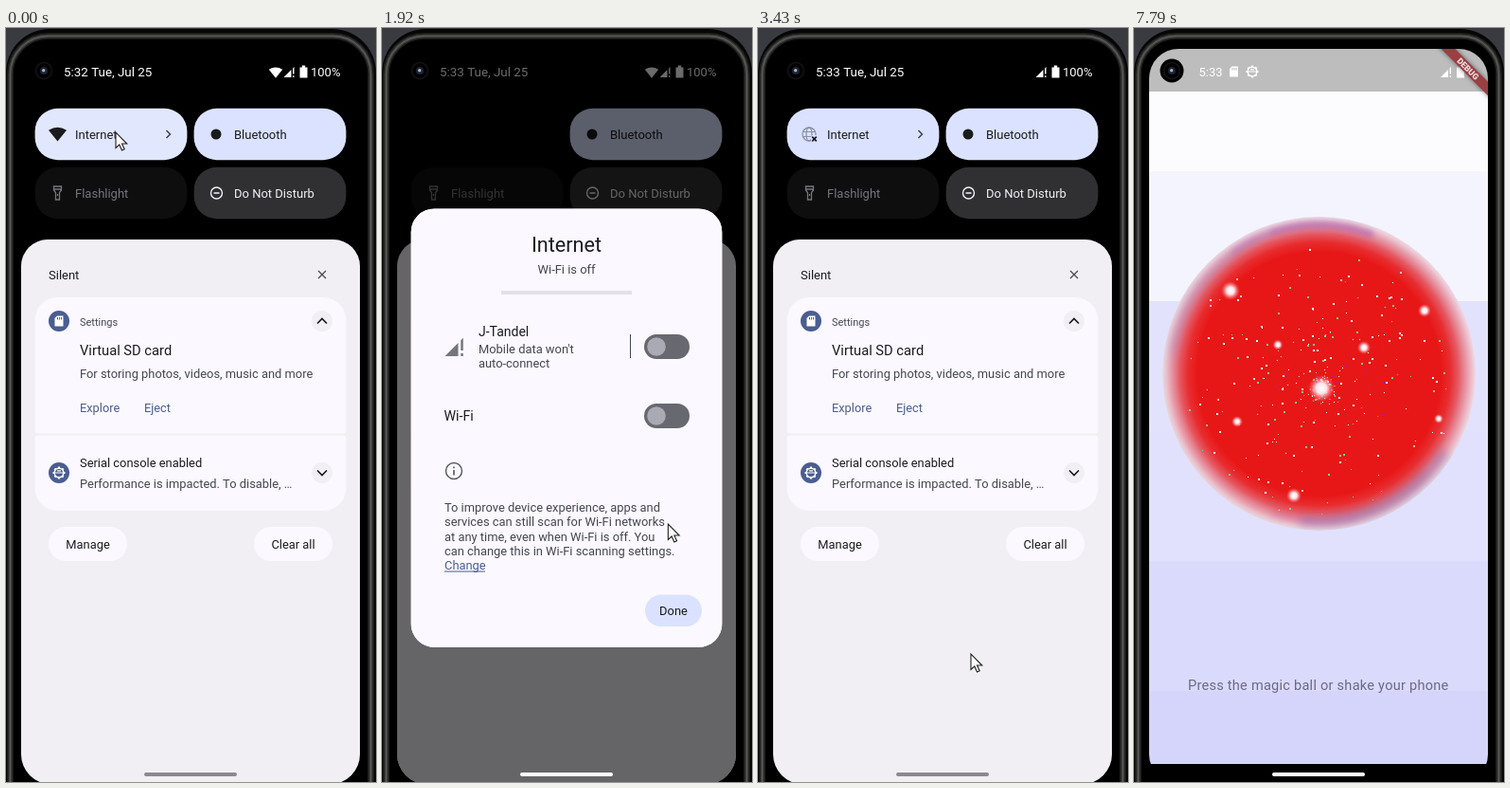
An HTML page with a canvas that plays this animation: 391 by 795 pixels, repeating every 8.62 s.

```html
<!DOCTYPE html>
<html lang="en">
<head>
<meta charset="utf-8">
<title>Phone demo</title>
<style>
html, body { margin: 0; width: 100%; height: 100%; overflow: hidden; background: #3a3b40; }
canvas { display: block; width: 391px; height: 795px; }
</style>
</head>
<body>
<canvas id="stage"></canvas>
<script>
const W = 391, H = 795, LOOP = 8620;
const canvas = document.getElementById('stage');
const dpr = window.devicePixelRatio || 1;
canvas.width = W * dpr;
canvas.height = H * dpr;
const c = canvas.getContext('2d');

const INK = '#1b1b1f', SOFT = '#45464f', BLUE = '#4a5d92', TINT = '#dae2ff';
const PANEL = '#f1eff4', CARD = '#fbf8ff';

// Bursts of motion: start, end, number of steps
const BURSTS = [[150, 1080, 8], [1230, 2210, 8], [2350, 3280, 8],
  [3430, 4390, 8], [4510, 5210, 6], [5480, 5610, 2]];

const CURSOR = [[0, 116, 110], [680, 116, 110], [1080, 308, 347], [1640, 308, 347],
  [2210, 297, 690], [2880, 297, 690], [3280, 225, 660], [3560, 225, 660],
  [4250, 283, 362], [5210, 283, 362], [5480, 365, 375]];

const mix = (a, b, k) => a + (b - a) * k;
const part = (t, a, b) => Math.min(1, Math.max(0, (t - a) / (b - a)));
const easeOut = k => 1 - (1 - k) ** 3;
const smooth = k => k * k * (3 - 2 * k);

function stepTime(t) {
  let last = 0;
  for (const [a, b, n] of BURSTS)
    for (let k = 0; k < n; k++) {
      const s = mix(a, b, k / (n - 1));
      if (s <= t + 12) last = s;
    }
  return last;
}

// ---- drawing helpers ----
function layer(fn, alpha = 1, dx = 0, dy = 0) {
  c.save();
  c.globalAlpha *= Math.max(0, alpha);
  c.translate(dx, dy);
  fn();
  c.restore();
}
function box(x, y, w, h, r, fill) {
  c.beginPath();
  c.roundRect(x, y, w, h, r);
  if (fill) { c.fillStyle = fill; c.fill(); }
}
function disc(x, y, r, fill) {
  c.beginPath();
  c.arc(x, y, r, 0, 7);
  c.fillStyle = fill;
  c.fill();
}
function ring(x, y, r, color, lw) {
  c.beginPath();
  c.arc(x, y, r, 0, 7);
  c.strokeStyle = color;
  c.lineWidth = lw;
  c.stroke();
}
function shape(d, x, y, fill, scale = 1) {
  layer(() => { c.scale(scale, scale); c.fillStyle = fill; c.fill(new Path2D(d)); }, 1, x, y);
}
function line(d, x, y, color, lw = 1.5) {
  layer(() => { c.strokeStyle = color; c.lineWidth = lw; c.stroke(new Path2D(d)); }, 1, x, y);
}
function text(s, x, y, color = INK, size = 13, { weight = 400, align = 'left', gap = 0 } = {}) {
  c.font = `${weight} ${size}px Roboto, sans-serif`;
  c.textAlign = align;
  c.letterSpacing = gap + 'px';
  c.fillStyle = color;
  c.fillText(s, x, y);
}

// ---- icons ----
const wifi = (x, y, color, k = 1) => shape('M0 8L-10 -4.5Q0 -11 10 -4.5Z', x, y, color, k);
function signal(x, y, color, k = 1) {
  shape('M0 12L8 4V12ZM9.6 2.4L11 1V8.5H9.6ZM9.6 10.3H11V12H9.6Z', x, y, color, k);
}
const battery = (x, y) => shape('M0 2H2.3V0H5.7V2H8V13H0Z', x, y, '#fff');
const sdCard = (x, y, color) => shape('M-2 -5.5H4.5V5.5H-4.5V-3Z', x, y, color);
const sdPins = (x, y, color) => line('M-1.5 -4V-1.5M.5 -4V-1.5M2.5 -4V-1.5', x, y, color, 1);
function cog(x, y, r, color, lw) {
  ring(x, y, r, color, lw);
  for (let i = 0; i < 8; i++)
    layer(() => { c.rotate(i * Math.PI / 4); line(`M0 ${-r}V${-r - 1.7}`, 0, 0, color, 2.2); }, 1, x, y);
}
function consoleIcon(x, y, color) {
  cog(x, y, 4.8, color, 1.5);
  line('M-4.5 0H4.5M-2 -2.2H2', x, y, color, 1.2);
}
function gear(x, y) {
  cog(x, y, 6.6, INK, 2);
  ring(x, y, 2.6, INK, 1.8);
}
function torch(x, y, color) {
  line('M-4 -7H4V-3L2 -.5V7H-2V-.5L-4 -3ZM-4 -4H4M0 1V3', x, y, color, 1.3);
}
function globe(x, y) {
  const g = '#8b91a6';
  ring(x, y, 7, g, 1.3);
  c.beginPath();
  c.ellipse(x, y, 3, 7, 0, 0, 7);
  c.stroke();
  line('M-6.5 -2.5H6.5M-6.5 2.5H6.5', x, y, g, 1.2);
  box(x + 2, y + 1, 8, 8, 2, TINT);
  line('M-2.3 -2.3L2.3 2.3M2.3 -2.3L-2.3 2.3', x + 5.5, y + 5, INK, 1.7);
}
function cursor(x, y) {
  const p = new Path2D('M0 0V16.5L3.8 13L6.5 19L9.2 17.8L6.5 12H11.8Z');
  layer(() => {
    c.fillStyle = '#fff';
    c.strokeStyle = '#222';
    c.lineWidth = 1.1;
    c.fill(p);
    c.stroke(p);
  }, 1, x, y);
}

// ---- phone body ----
function body() {
  c.fillStyle = '#3a3b40';
  c.fillRect(0, 0, W, H);
  box(0, 1, 391, 860, 46, '#060607');
  box(4.5, 8.5, 381, 860, 40);
  for (const [lw, color] of [[7, '#1a1a1a'], [4, '#383837'], [1.6, '#585856']]) {
    c.lineWidth = lw;
    c.strokeStyle = color;
    c.stroke();
  }
  box(8, 12, 374, 860, 37, '#000');
}
function camera() {
  disc(40, 45, 12.5, '#000');
  ring(40, 45, 8.5, '#121417', 1.5);
  disc(40, 45, 4, '#1d2333');
  disc(39.7, 44.7, 1.7, '#a9b2cc');
}

// ---- notification shade ----
function tile(x, y, fill, label, color) {
  box(x - .4, y - .2, 160.8, 54.4, 24, fill);
  text(label, x + 42, y + 32, color);
}
function tiles(t, showInternet) {
  const off = t > 2400;
  if (showInternet) {
    tile(31, 85, t < 150 ? '#e1e7fd' : TINT, 'Internet', INK);
    if (off) globe(54, 112); else wifi(54.5, 112, INK, .95);
    line('M-2 -4L2 0L-2 4', 171.5, 112, '#3d4150');
  }
  tile(199, 85, TINT, 'Bluetooth', INK);
  disc(222, 112, 5.5, INK);
  tile(31, 147, '#0e0e0f', 'Flashlight', '#77777b');
  torch(54.5, 174, '#77777b');
  tile(199, 147, '#303033', 'Do Not Disturb', '#f2f0f4');
  ring(222.5, 174, 6, '#f2f0f4', 1.4);
  line('M-3 0H3', 222.5, 174, '#f2f0f4');
}
function header(t) {
  text(`5:${t < 680 ? 32 : 33} Tue, Jul 25`, 61, 51, '#fff', 13.4);
  if (t < 2950) {
    wifi(285, 47, '#fff', .72);
    if (t > 2340) {
      c.fillStyle = '#000';
      c.fillRect(286, 46, 5, 8);
      c.fillStyle = '#fff';
      c.fillRect(288, 46, 1.6, 4.5);
      c.fillRect(288, 51.5, 1.6, 1.6);
    }
  }
  signal(293.5, 40, '#fff');
  battery(310.5, 39.5);
  text('100%', 322, 51, '#fff');
}
function notifications() {
  box(16, 223, 358, 600, 28, PANEL);
  text('Silent', 45, 265);
  line('M-4 -4L4 4M4 -4L-4 4', 334, 260, SOFT, 1.2);

  box(30.6, 284, 328.8, 143.5, [24, 24, 3, 3], CARD);
  disc(56, 309, 11, BLUE);
  sdCard(56, 309, '#fff');
  sdPins(56, 309, BLUE);
  text('Settings', 78, 313.5, SOFT, 11);
  text('Virtual SD card', 78, 345, INK, 14.7);
  text('For storing photos, videos, music and more', 78, 369, SOFT, 12.9);
  text('Explore', 78, 404.5, BLUE, 12.8);
  text('Eject', 146, 404.5, BLUE, 12.8);
  disc(334, 309, 11, PANEL);
  line('M-5 2.5L0 -2.5L5 2.5', 334, 309, INK, 1.7);

  box(30.6, 429.5, 328.8, 79.5, [3, 3, 24, 24], CARD);
  disc(56, 469, 11, BLUE);
  consoleIcon(56, 469, '#fff');
  text('Serial console enabled', 78, 463, INK, 12.9);
  text('Performance is impacted. To disable, …', 78, 485, SOFT, 12.9);
  disc(334, 469, 11, PANEL);
  line('M-5 -2.5L0 2.5L5 -2.5', 334, 469, INK, 1.7);

  box(45, 526, 83, 36, 18, CARD);
  text('Manage', 86.5, 549, INK, 12.9, { align: 'center' });
  box(262, 526, 83, 36, 18, CARD);
  text('Clear all', 303.5, 549, INK, 12.9, { align: 'center' });
}
function shade(t, showInternet) {
  const p = smooth(part(t, 3520, 4110));
  if (p === 1) return;
  layer(() => { c.fillStyle = '#000'; c.fillRect(0, 0, W, H); }, 1 - p);
  layer(() => { header(t); tiles(t, showInternet); }, 1 - p * 1.7, 0, -p * 30);
  layer(notifications, 1 - p * p, 0, -p * 560);
}

// ---- internet dialog ----
function toggle(y, on, enabled) {
  box(277, y - 13, 48, 26, 13, enabled ? BLUE : '#676870');
  disc(mix(290, 312, on), y, 9.8, enabled ? '#fff' : '#a9aab3');
}
// Coordinates as if the dialog top were at 134
function dialogContent(t, bottom) {
  const off = t > 1600, mid = { align: 'center' };
  text('Internet', 195, 179.5, INK, 21.6, mid);
  text(off ? 'Wi-Fi is off' : 'Tap a network to connect', 195, 203, SOFT, 12.9, mid);
  c.fillStyle = '#e2e1e9';
  c.fillRect(126, 221, 138, 4);
  if (!off) {
    const u = (t - 70) % 900 / 900;
    const tail = Math.max(0, (u - .25) * 2), head = Math.min(1, u * 1.7);
    c.fillStyle = BLUE;
    if (head > tail) c.fillRect(126 + 138 * tail, 221, 138 * (head - tail), 4);
  }
  signal(66.5, 269, '#74757d', 1.75);
  text('J-Tandel', 102, 269, INK, 14);
  text("Mobile data won't", 102, 287, SOFT, 12.9);
  text('auto-connect', 102, 302, SOFT, 12.9);
  c.fillStyle = SOFT;
  c.fillRect(262, 267, 1, 25);
  toggle(280, 0, false);
  text('Wi-Fi', 65.5, 358, INK, 14.2);
  toggle(353, 1 - smooth(part(t, 1520, 1700)), t < 1300);
  if (off) {
    ring(76, 411, 8.5, '#5c5d66', 1.5);
    line('M0 -1V4.5M0 -4.5V-2.8', 76, 411, '#5c5d66', 1.7);
    ['To improve device experience, apps and', 'services can still scan for Wi-Fi networks',
      'at any time, even when Wi-Fi is off. You', 'can change this in Wi-Fi scanning settings.']
      .forEach((s, i) => text(s, 66, 454 + i * 15.3, SOFT, 12.9));
    text('Change', 66, 515, BLUE, 12.9);
    c.fillRect(66, 516.5, 43, 1);
  } else {
    box(45, 385.5, 300, 65.5, 26, TINT);
    wifi(74.5, 418, INK, 1.08);
    text('LanternWifi', 100, 415, INK, 12.9);
    text('Connected', 100, 432, SOFT, 12.9);
    gear(312, 418);
  }
  box(278, bottom - 55, 60, 33.5, 17, TINT);
  text('Done', 308, bottom - 33.5, INK, 12.9, mid);
}
function dialog(t, open) {
  const shrink = easeOut(part(t, 1600, 1950));
  const top = mix(134.4, 190.4, shrink), end = mix(708.5, 653, shrink);
  const x = 30.6, w = mix(160, 328.8, open);
  const y = mix(85, top, open), h = mix(54, end - top, open);
  layer(() => {
    box(x, y, w, h, mix(24, 25, open), mix(0, 1, open) > .4 ? CARD : TINT);
    c.clip();
    layer(() => { c.fillStyle = CARD; c.fillRect(x, y, w, h); }, part(open, 0, .4));
    layer(() => text('Internet', 73, y + 32), 1 - part(open, 0, .3));
    layer(() => dialogContent(t, 134 + h), part(open, .3, .8), (w - 328.8) / 2, Math.round(y - 134));
  });
}

// ---- magic ball app ----
const BX = 195.5, BY = 364.5, BR = 165.5;
let seed = 11;
const rnd = () => (seed = (seed * 16807) % 2147483647) / 2147483647;
const stars = Array.from({ length: 270 }, () => {
  const a = rnd() * 6.283, r = 150 * rnd(), k = rnd();
  const hue = k < .6 ? '#fff' : k < .87 ? '#72d884' : r < 75 ? '#b013c0' : '#f6b5b5';
  return {
    x: Math.round(BX + 3 + r * Math.cos(a)), y: Math.round(BY + 8 + r * Math.sin(a) * .95),
    s: rnd() < .45 ? 2 : 1, hue
  };
});
const GLOWS = [[102, 277, 10], [307, 298, 7], [243, 337, 7], [152, 334, 5.5], [109, 415, 6],
  [322, 412, 5], [169, 493, 8], [198, 380, 14]];

function radial(x, y, r, stops) {
  const g = c.createRadialGradient(x, y, 0, x, y, r);
  stops.forEach(([k, col]) => g.addColorStop(k, col));
  return g;
}
function sheen(r, from, to, color, lw, blur) {
  c.filter = `blur(${blur}px)`;
  c.beginPath();
  c.arc(BX, BY, r, from, to);
  c.strokeStyle = color;
  c.lineWidth = lw;
  c.stroke();
  c.filter = 'none';
}
function inBall(fn) {
  layer(() => {
    c.beginPath();
    c.arc(BX, BY, BR, 0, 7);
    c.clip();
    fn();
  });
}
function bubble() {
  disc(BX, BY, BR, radial(BX, BY, BR, [[0, '#fcfcfe'], [.79, '#fcfcfe'], [.8, '#f5f5fd'],
    [.86, '#f3f2fd'], [.87, '#efeefd'], [.95, '#ebeafd'], [.98, '#f1f3ff'], [1, '#e9f0fd']]));
  inBall(() => {
    sheen(157, -1.9, -1.2, '#d3c5fa', 6, 2.5);
    sheen(155, -3.1, -2.0, '#dce3fb', 8, 3);
    sheen(152, .75, 1.5, '#c9d8f3', 12, 4);
    sheen(154, 1.3, 1.9, '#d9d0fa', 8, 3);
    sheen(158, -.9, .6, '#f1e8fb', 8, 3);
    sheen(164, .5, 3.8, '#dcf0fc', 2, .8);
  });
  disc(54, 412, .8, '#fff');
  disc(257, 497, 1, '#fff');
}
function redBall() {
  disc(BX, BY, BR, radial(BX, BY, BR, [[0, '#e81717'], [.78, '#e81717'],
    [.84, 'rgba(230,28,30,.92)'], [.89, 'rgba(226,36,44,.74)'], [.94, 'rgba(222,50,60,.46)'],
    [.98, 'rgba(228,80,85,.27)'], [1, 'rgba(240,140,140,.22)']]));
  inBall(() => {
    sheen(156, .55, 1.7, 'rgba(130,105,185,.38)', 11, 4);
    sheen(157, -2.2, -1.2, 'rgba(140,90,190,.36)', 7, 3);
    sheen(156, -3, -2.2, 'rgba(150,120,190,.25)', 8, 4);
  });
  for (const s of stars) {
    c.fillStyle = s.hue;
    c.fillRect(s.x, s.y, s.s, s.s);
  }
  for (const [x, y, r] of GLOWS)
    disc(x, y, r, radial(x, y, r, [[0, '#fff'], [.4, 'rgba(255,240,245,.95)'],
      [.65, 'rgba(255,190,200,.55)'], [1, 'rgba(255,120,120,0)']]));
  for (let i = 0; i < 32; i++) {
    const a = i * 2.4, r = 9 + i % 5 * 1.6;
    c.fillStyle = i % 4 ? '#ffe4ee' : '#b04ad0';
    c.fillRect(198 + r * Math.cos(a), 380 + r * Math.sin(a), 1, 1);
  }
}
function debugBanner() {
  layer(() => {
    c.rotate(Math.PI / 4);
    c.shadowColor = 'rgba(0,0,0,.5)';
    c.shadowBlur = 5;
    c.fillStyle = '#9b3f42';
    c.fillRect(-50, -5.2, 100, 10.4);
    c.shadowBlur = 0;
    text('DEBUG', 0, 3.2, '#efe2e2', 8.9, { weight: 900, align: 'center' });
  }, 1, 353, 43);
}
function app(t) {
  const late = t > 5400;
  const bands = [[22, '#bdbdbd'], [67, '#fcfcff'], [151, '#f4f4fe'], [288, late ? '#e2e2fd' : '#e9e9fd'],
    [425, '#e1e1fd'], [562, '#dadafc'], [699, '#d5d5fb'], [776]];
  for (let i = 0; i < bands.length - 1; i++) {
    const [y, fill] = bands[i];
    c.fillStyle = fill;
    c.fillRect(16, y, 358, bands[i + 1][0] - y);
  }
  text('5:33', 68.5, 51, '#fff');
  sdCard(105.5, 46, '#fff');
  sdPins(105.5, 46, '#bdbdbd');
  consoleIcon(125, 46, '#fff');
  signal(324, 40, '#fff');
  battery(341, 39.5);
  debugBanner();

  bubble();
  const red = late ? (t > 5600 ? 1 : .96) : .88 * smooth(part(t, 4560, 5210));
  if (red) layer(redBall, red);
  layer(() => text('My reply is no.', 189.5, 372.5, '#69638e', 22.8, { weight: 700, align: 'center' }),
    1 - part(t, 4430, 4850));
  text('Press the magic ball or shake your phone', 57, 697.5, '#6c6988', 14.6, { gap: .23 });
}

function pillColor(t, open) {
  if (t > 5400) return '#fff';
  if (t > 3900) return '#bfbfc2';
  if (open > .5) return t > 1600 ? '#fff' : '#dedede';
  return '#8b8a8e';
}
function cursorAt(t) {
  const i = CURSOR.findIndex(k => k[0] >= t);
  if (i < 1) return CURSOR[0].slice(1);
  const [t0, x0, y0] = CURSOR[i - 1], [t1, x1, y1] = CURSOR[i];
  const k = smooth(part(t, t0, t1));
  return [mix(x0, x1, k), mix(y0, y1, k)];
}

function draw(t) {
  c.setTransform(dpr, 0, 0, dpr, 0, 0);
  body();
  const open = easeOut(part(t, 120, 720)) * (1 - smooth(part(t, 2700, 3160)));
  layer(() => {
    box(16, 22, 358, 775, 31);
    c.clip();
    if (t > 3430) app(t);
    shade(t, open === 0);
    if (open > 0) {
      layer(() => { c.fillStyle = '#000'; c.fillRect(0, 0, W, H); }, .58 * open);
      dialog(t, open);
    }
  });
  camera();
  box(146, 785, 98, 4, 2, pillColor(t, open));
  if (t < 5500) cursor(...cursorAt(t));
}

let shown = -1;
function tick() {
  const t = stepTime(performance.now() % LOOP);
  if (t !== shown) draw(shown = t);
  requestAnimationFrame(tick);
}
tick();
</script>
</body>
</html>
```
